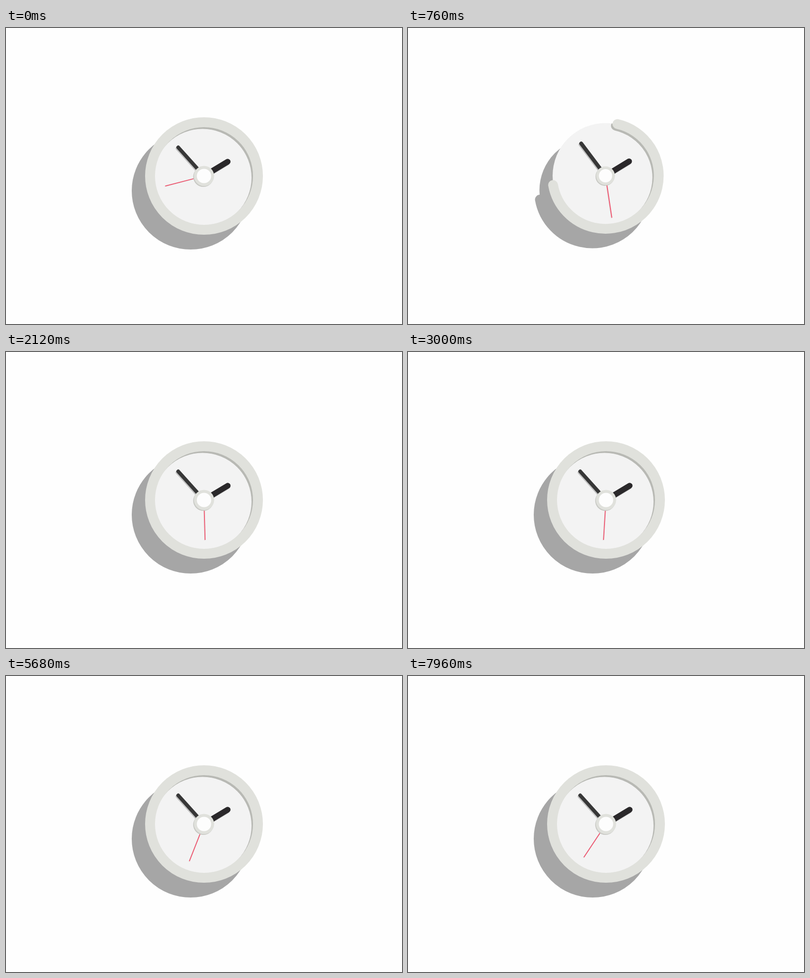
Write an HTML page that moves like this. It is 800 by 600 pixels and loops after 8000 ms.

```html
<!DOCTYPE html>
<html lang="en">
<head>
<meta charset="utf-8">
<title>Clock</title>
<style>
  html, body { margin: 0; width: 100%; height: 100%; overflow: hidden; background: #fefefe; }
  svg { display: block; width: 100%; height: 100%; }
  line { stroke-linecap: round; }
</style>
</head>
<body>
<svg viewBox="0 0 800 600">
  <defs>
    <circle id="ring" r="109" pathLength="360" fill="none" stroke-width="20" stroke-linecap="round"/>
    <circle id="face" r="109"/>
    <line id="hour" y2="-56" stroke-width="11.5"/>
    <line id="minute" y2="-78" stroke-width="7.4"/>
    <line id="second" y2="-81" stroke-width="1.8" style="stroke-linecap:butt"/>
    <clipPath id="dial"><use href="#face"/></clipPath>
  </defs>
  <g id="clock">
    <g id="cast" fill="#a6a6a6" stroke="none">
      <use href="#face"/>
      <use href="#ring" stroke="#a6a6a6"/>
    </g>
    <use href="#face" fill="#f3f3f3"/>
    <g clip-path="url(#dial)">
      <use href="#ring" x="-3" y="3.5" stroke="#b8b9b4"/>
    </g>
    <use href="#ring" stroke="#e0e1dc"/>
    <use href="#hour" x="-1.5" y="2" stroke="#c6c6c6"/>
    <use href="#hour" stroke="#2a282a"/>
    <use href="#minute" x="-1.5" y="2" stroke="#c2c2c2"/>
    <use href="#minute" stroke="#373737"/>
    <use href="#second" x="-1" y="1" stroke="#e4e2e2"/>
    <use href="#second" stroke="#ee566f"/>
    <g id="hub">
      <circle cx="-1.3" cy="1.5" r="20.5" fill="#c6c7c2"/>
      <circle r="20.5" fill="#e0e1dc"/>
      <circle r="14.5" fill="#fdfdfd"/>
    </g>
  </g>
</svg>
<script>
const LOOP = 8000, STEP = 40, INTRO = 40;
const el = id => document.getElementById(id);
const move = (id, value) => el(id).setAttribute('transform', value);

// Springy ease-out, 0 to 1
function elastic(p, period) {
  if (p <= 0) return 0;
  if (p >= 1) return 1;
  return 1 + 2 ** (-10 * p) * Math.sin((p - period / 4) * 2 * Math.PI / period);
}

function spring(t, start, dur, period) {
  return elastic((t - start) / dur, period);
}

function smooth(t, start, end) {
  const p = Math.min(1, Math.max(0, (t - start) / (end - start)));
  return 0.5 - 0.5 * Math.cos(Math.PI * p);
}

function secondAngle(t) {
  const ticks = (t - 1100) / 1000;
  const whole = Math.floor(ticks);
  return 171.5 + 6 * (whole + elastic(ticks - whole, 0.6));
}

function hand(id, angle, scale) {
  move(id, `rotate(${angle}) scale(${scale})`);
}

function draw(time) {
  // The first frame shows the clock late in its run, just before it is rebuilt
  const t = time < INTRO ? 15000 : time;

  const wobble = Math.exp(-Math.abs(t - 760) / 200) * Math.cos((t - 760) / 110);
  const size = 1 - 0.013 * wobble;
  move('clock', `translate(${400 - wobble} ${300 - wobble / 2})`);

  const lift = spring(t, 200, 1000, 0.3);
  move('cast', `translate(${-27 * lift} ${30 * lift})`);
  move('face', `scale(${spring(t, INTRO, 1000, 0.75) * size})`);

  const drawn = smooth(t, 300, 1040);
  const ring = el('ring');
  ring.setAttribute('stroke-dasharray', `${360 * drawn} 720`);
  ring.setAttribute('visibility', drawn > 0 ? 'visible' : 'hidden');
  move('ring', `rotate(${-90 + 41 * (1 - drawn)}) scale(${size})`);

  hand('hour', 58.8 * spring(t, 440, 2150, 0.6), spring(t, 310, 1000, 0.6));
  hand('minute', -41.9 * spring(t, 496, 2150, 0.6), spring(t, 380, 1000, 0.6));
  hand('second', secondAngle(t), spring(t, 395, 1000, 0.6));
  move('hub', `scale(${spring(t, 425, 1000, 0.3)})`);
}

let origin;
function tick(now) {
  origin ??= now;
  const time = (now - origin) % LOOP;
  draw(Math.floor(time / STEP) * STEP);
  requestAnimationFrame(tick);
}
draw(0);
requestAnimationFrame(tick);
</script>
</body>
</html>
```
